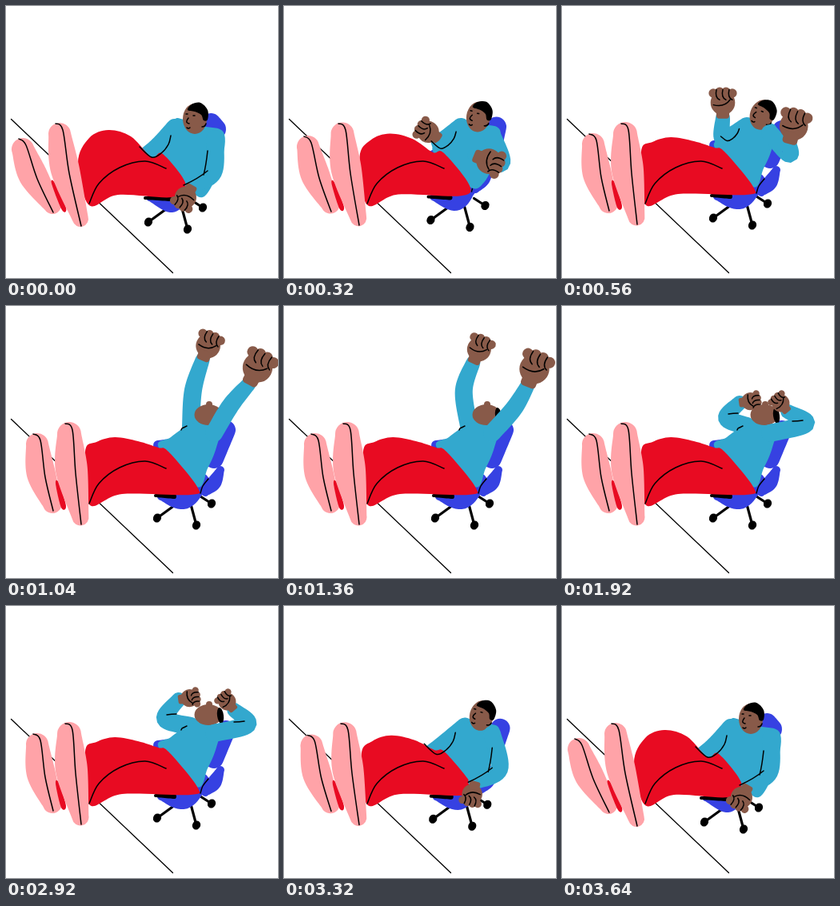
Recreate the animation shown at these times as an HTML page. Size 340 px wide and 340 px high, loop 4040 ms.

```html
<!DOCTYPE html>
<html lang="en">
<head>
<meta charset="utf-8">
<title>Stretching in the office chair</title>
<style>
html, body { margin: 0; width: 100%; height: 100%; overflow: hidden; background: #fff; }
svg { display: block; width: 100%; height: 100%; }
svg * { stroke-linecap: round; stroke-linejoin: round; vector-effect: non-scaling-stroke; }
</style>
</head>
<body>
<svg id="stage" viewBox="0 0 340 340"></svg>
<script>
const PINK = '#ffa3a8', RED = '#e80b22', SHIRT = '#33a8ce', BLUE = '#3641e2', SKIN = '#885a49', INK = '#000';
const LOOP = 4040;
const DRIFT = [11, -5]; // how far the chair rolls when fully reclined

// body: lean, arms at rest, head tilted back, arms folded
// far, near: elbow x y, hand x y, hand angle, hand size
const rest = { body: [0, 1, 0, 0], head: [236, 141], far: [191, 174, 158, 194, -205, 14], near: [259, 208, 224, 240, 120, 16] };
const settle = { body: [.75, 1, 0, 0], head: [247, 137], far: [200, 172, 168, 190, -205, 14], near: [269, 204, 235, 236, 105, 15] };
const fists = { body: [1, .5, 0, 0], head: [250, 136], far: [202, 166, 201, 120, -90, 18], near: [284, 185, 290, 149, -75, 21] };
const reach = { body: [1, 0, 1, 0], head: [253, 136], far: [234, 105, 253, 49, -68, 18], near: [281, 124, 315, 76, -62, 22] };
const curve = { ...reach, far: [211, 106, 231, 60, -63, 17], near: [297, 134, 311, 80, -76, 22] };
const unfold = { ...reach, body: [1, 0, 1, 1], far: [199, 141, 230, 115, -8, 13], near: [302, 148, 276, 119, -130, 13] };
const folded = { ...unfold, far: [206, 140, 236, 119, -8, 13], near: [305, 147, 273, 121, -130, 13] };

// time, pose, easing power towards it
const KEYS = [
  [0, rest], [80, rest], [560, fists], [1040, reach], [1200, reach], [1600, curve], [1920, folded, 2],
  [2840, folded], [2920, unfold], [3120, fists], [3320, settle], [3640, rest], [LOOP, rest]
];

const stage = document.getElementById('stage');
const updates = [];
const pts = s => s.split(' ').map(p => p.split(',').map(Number));
const lerp = (a, b, k) => a.map((v, i) => Array.isArray(v) ? lerp(v, b[i], k) : v + (b[i] - v) * k);

function add(tag, attrs, parent = stage) {
  const el = document.createElementNS('http://www.w3.org/2000/svg', tag);
  set(el, attrs);
  parent.append(el);
  return el;
}
function set(el, attrs) {
  for (const k in attrs) el.setAttribute(k, attrs[k]);
}
const ink = (width = 1.5) => ({ fill: 'none', stroke: INK, 'stroke-width': width });

// Smooth curve through points
function spline(p, closed) {
  const n = p.length;
  const at = i => closed ? p[(i + n) % n] : p[Math.max(0, Math.min(n - 1, i))];
  let d = 'M' + p[0];
  for (let i = 0; i < (closed ? n : n - 1); i++) {
    const [o, a, b, c] = [-1, 0, 1, 2].map(j => at(i + j));
    d += `C${a.map((v, j) => v + (b[j] - o[j]) / 6)} ${b.map((v, j) => v - (c[j] - a[j]) / 6)} ${b}`;
  }
  return closed ? d + 'Z' : d;
}

// Rounded tapering tube through [x, y, radius] nodes
function tube(nodes) {
  const n = nodes.length, steps = 12, mid = [];
  for (let s = 0; s <= (n - 1) * steps; s++) {
    const i = Math.min(n - 2, Math.floor(s / steps)), u = s / steps - i;
    const [o, a, b, c] = [-1, 0, 1, 2].map(j => nodes[Math.max(0, Math.min(n - 1, i + j))]);
    mid.push(a.map((v, j) => v + u / 2 * (b[j] - o[j] + u * (2 * o[j] - 5 * v + 4 * b[j] - c[j] + u * (3 * (v - b[j]) + c[j] - o[j])))));
  }
  const side = sign => mid.map(([x, y, r], i) => {
    const p = mid[Math.max(0, i - 1)], q = mid[Math.min(mid.length - 1, i + 1)];
    const a = Math.atan2(q[1] - p[1], q[0] - p[0]) + sign * Math.PI / 2;
    return [x + r * Math.cos(a), y + r * Math.sin(a)];
  });
  const right = side(1), left = side(-1).reverse();
  const cap = ([, , r], to) => `A${r} ${r} 0 0 0 ${to}`;
  return 'M' + right.join('L') + cap(mid[mid.length - 1], left[0]) + 'L' + left.join('L') + cap(mid[0], right[0]) + 'Z';
}

// Parts that morph from upright to reclined
function leaning(make, style, from, to) {
  const el = add('path', style), a = pts(from), b = pts(to);
  updates.push(({ body: [lean] }) => set(el, { d: make(lerp(a, b, lean)) }));
}
const leanTube = (fill, from, to) => leaning(tube, { fill }, from, to);
const leanBlob = (fill, from, to) => leaning(p => spline(p, true), { fill }, from, to);

function foot(from, to) {
  leanTube(PINK, from, to);
  const sole = ([t, m, h]) => spline([[t[0] - 5, t[1] - 13], [t[0] + 4, t[1] - 5], [m[0] + 5, m[1] + 4], [h[0] + 1, h[1] + 9]]);
  leaning(sole, ink(), from, to);
}

function wrist([, , x, y, angle, size]) {
  const a = angle * Math.PI / 180;
  return [x - 1.1 * size * Math.cos(a), y - 1.1 * size * Math.sin(a)];
}
function arm(name, from, to) {
  const el = add('path', { fill: SHIRT });
  updates.push(s => {
    const limb = s[name];
    set(el, { d: tube([[...lerp(from, to, s.body[0]), 11], [limb[0], limb[1], 11], [...wrist(limb), 9]]) });
  });
}
// Unit-sized fist with its fingers towards +x
function hand(name) {
  const g = add('g', { fill: SKIN });
  add('ellipse', { cx: -.05, rx: .85, ry: .85 }, g);
  add('rect', { x: -1.15, y: -.45, width: .7, height: .9, rx: .2 }, g);
  let lines = 'M-.2-.65Q-.4 .1 .15 .5';
  for (let i = 0; i < 4; i++) {
    const y = -.66 + .44 * i;
    add('circle', { cx: .72 - .25 * y * y, cy: y, r: .32 }, g);
    if (i) lines += `M.85 ${y - .22}Q.3 ${y - .35} .15 ${y}`;
  }
  add('path', { d: lines, ...ink() }, g);
  updates.push(s => {
    const [, , x, y, angle, size] = s[name];
    set(g, { transform: `translate(${x} ${y}) rotate(${angle}) scale(${size})` });
  });
}

// Desk edge
add('path', { d: 'M6.5 141.5L208.5 333.5', ...ink(1.3) });

// Chair
leanTube(BLUE, '256,147,13 262,154,13', '275,155,12 260,191,12');
leanTube(BLUE, '185,197,6 200,199,6', '190,174,6 206,172,6');
const base = add('g', {});
for (const [x, y, wx, wy] of [[200, 254, 178, 270], [220, 253, 227, 279], [232, 243, 246, 252]]) {
  add('path', { d: `M${x} ${y}L${wx} ${wy}`, ...ink(3.2) }, base);
  add('ellipse', { cx: wx, cy: wy, rx: 5, ry: 5.7, transform: `rotate(25 ${wx} ${wy})` }, base);
}
updates.push(({ body: [lean] }) => set(base, { transform: `translate(${DRIFT.map(v => v * lean)})` }));
leanTube(BLUE, '180,240,4 205,245,13 215,240,10', '194,238,5 222,241,13 244,219,10');
leanTube(INK, '174,240,2 205,241,3', '187,237,2 210,238,3');
leanTube(BLUE, '244,200,6 238,212,8 230,225,5', '268,205,5 260,221,9 249,233,5');
leaning(spline, ink(), '226,230 228,222 232,214', '243,234 246,225 253,216');

// Far arm, torso
arm('far', [211, 152], [231, 150]);
hand('far');
leanBlob(SHIRT,
  '210,142 194,163 182,188 224,225 248,238 269,195 272,158 245,150 222,142',
  '224,151 206,164 191,177 238,226 252,203 262,180 268,152 255,146 236,146');

// Legs
foot('21,179,14 34,212,18 58,249,11', '39,173,14 44,210,18 58,247,12');
leanBlob(RED, '57,222 61,221 75,252 70,255', '62,222 66,221 75,250 69,252');
leanBlob(RED,
  '90,196 104,165 128,155 156,163 182,189 196,185 225,223 208,239 140,236 104,249',
  '99,182 113,170 136,164 165,169 190,177 203,182 239,226 230,236 145,235 104,248');
add('path', { d: spline(pts('104,247 116,222 142,202 174,194 200,203')), ...ink() });
foot('67,160,14 74,205,18 93,266,10', '79,160,15 82,205,20 93,264,10.5');

// Head: a face that flattens as it tips back, then chin, nose tip and a sliver of hair
const nose = add('circle', { r: 4, fill: SKIN });
const skull = add('ellipse', { fill: SKIN });
const face = add('g', {});
add('path', { d: spline(pts('-9,-11 -4,-18 7,-20 16,-11 16,1 11,2 8,-5 0,-9'), true) }, face);
add('path', { d: 'M-11-6h2M-2-4h2M-8-1Q-13 5-7 6M-10 11q2 2 4 0M9 10q4 0 5-4', ...ink() }, face);
const nape = add('ellipse', { rx: 4, ry: 10 });
updates.push(({ head: [x, y], body: [lean, , tilt] }) => {
  const up = 1 - tilt, turn = 18 * lean * up;
  set(skull, { rx: 15 + 2.5 * tilt, ry: 19 - 6 * tilt, transform: `translate(${x} ${y}) rotate(${turn})` });
  set(face, { transform: `translate(${x} ${y}) rotate(${turn}) scale(1 ${up})`, opacity: up > 0 ? 1 : 0 });
  set(nose, { cx: x + tilt, cy: y - 13 * tilt });
  set(nape, { transform: `translate(${x + 15} ${y + 1}) rotate(-8) scale(${tilt})` });
});

// Near arm
arm('near', [261, 166], [260, 159]);
hand('near');

// Sleeve folds
const armpit = add('path', ink()), sleeve = add('path', { d: 'M252 181Q250 200 247 211M222 224Q240 216 252 206', ...ink() });
const elbows = add('path', ink());
const slack = pts('206,162 203,173 194,184 182,189 167,176');
const taut = pts('226,150 224,151 222,152 220,153 219,155');
updates.push(({ body: [lean, atRest, , fold], far, near }) => {
  const move = `translate(${DRIFT.map(v => v * lean * atRest)})`;
  set(armpit, { d: spline(lerp(taut, slack, atRest)), transform: move });
  set(sleeve, { transform: move, opacity: atRest > .8 ? 1 : 0 });
  set(elbows, { d: `M${far[0] + 2} ${far[1] - 5}q6-1 12-1M${near[0] - 4} ${near[1] - 4}q-6 1-13 1`, opacity: fold });
});

function draw(ms) {
  const t = ms % LOOP;
  // The picture steps every 80 ms; the second half is offset by 40 ms.
  const shift = t < 2000 ? 0 : 40;
  const step = Math.floor((t - shift) / 80) * 80 + shift;
  const i = Math.max(1, KEYS.findIndex(k => k[0] >= step));
  const [t0, from] = KEYS[i - 1], [t1, to, power = 1] = KEYS[i];
  const k = ((step - t0) / (t1 - t0)) ** power;
  const pose = {};
  for (const part in from) pose[part] = lerp(from[part], to[part], k);
  for (const update of updates) update(pose);
}

const start = performance.now();
function tick() {
  draw(performance.now() - start);
  requestAnimationFrame(tick);
}
tick();
</script>
</body>
</html>
```
